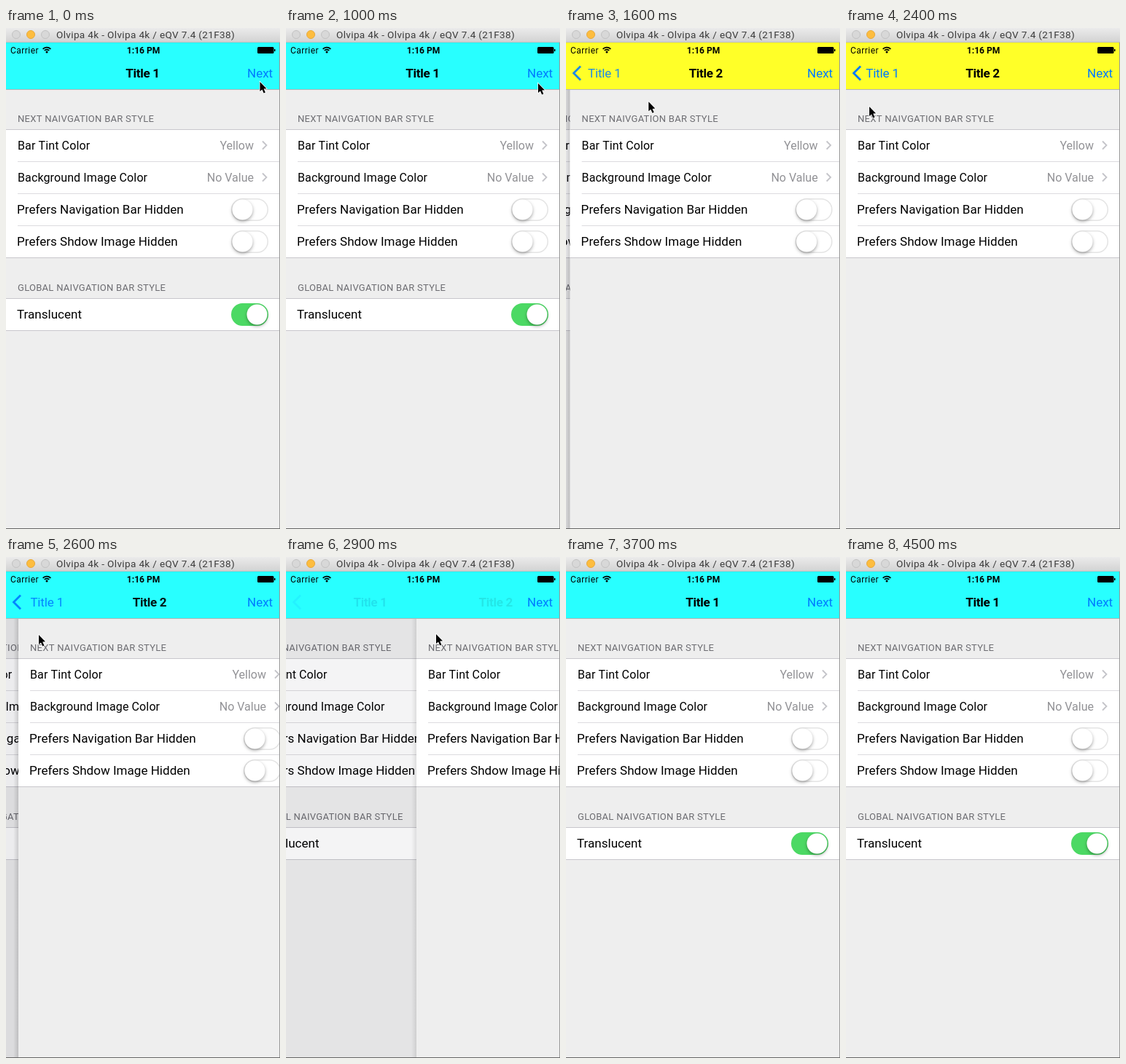
Write an HTML page with a canvas that moves like this. It is 376 px wide and 688 px high and loops after 4.6 s.

```html
<!DOCTYPE html>
<html lang="en">
<head>
<meta charset="utf-8">
<title>Navigation bar demo</title>
<style>
html, body { margin: 0; width: 100%; height: 100%; overflow: hidden; background: #eee; }
canvas { display: block; width: 376px; height: 688px; }
</style>
</head>
<body>
<canvas id="stage" width="376" height="688"></canvas>
<script>
const ctx = document.getElementById('stage').getContext('2d');
const LOOP = 4600, STEP = 100, WIDTH = 375;
const CYAN = '#28ffff', YELLOW = '#ffff28', BLUE = '#007aff', LINE = '#c8c7cc';
const PUSH_START = 1050, PUSH_TIME = 730, DRAG_START = 2500, RELEASE = 3300, POP_END = 3600;

// [time, x, y]
const CURSOR = [
  [0, 348.5, 74], [900, 348.5, 74], [1000, 346, 76], [1300, 250, 87.5], [1500, 150, 98],
  [1800, 40, 108], [2200, 33, 108], [2400, 32, 108], [2500, 20, 108], [2600, 45, 107],
  [2700, 112, 106], [2900, 206, 106], [3300, 289, 115], [3500, 345, 112], [3650, 390, 110]
];
// [time, left edge of the dragged page]
const DRAG = [[2500, 0], [2600, 17], [2700, 84], [2900, 179], [3300, 259]];

const clamp = v => Math.max(0, Math.min(1, v));
const easeOut = u => 1 - (1 - clamp(u)) ** 3;

function track(keys, t, column) {
  const next = keys.findIndex(k => k[0] > t);
  if (next < 0) return keys[keys.length - 1][column];
  if (next === 0) return keys[0][column];
  const a = keys[next - 1], b = keys[next];
  return a[column] + (b[column] - a[column]) * (t - a[0]) / (b[0] - a[0]);
}

function rect(x, y, w, h, color) {
  ctx.fillStyle = color;
  ctx.fillRect(x, y, w, h);
}

function text(str, x, y, { size = 17, weight = 400, color = '#000', gap = 0, align = 'left', alpha = 1 } = {}) {
  if (alpha <= 0) return;
  ctx.save();
  ctx.globalAlpha = alpha;
  ctx.font = `${weight} ${size}px Roboto, Inter, sans-serif`;
  ctx.letterSpacing = gap + 'px';
  ctx.textAlign = align;
  ctx.fillStyle = color;
  ctx.fillText(str, x, y);
  ctx.restore();
}

function polyline(points, color, width, alpha = 1) {
  ctx.save();
  ctx.globalAlpha = alpha;
  ctx.strokeStyle = color;
  ctx.lineWidth = width;
  ctx.beginPath();
  points.forEach(([x, y]) => ctx.lineTo(x, y));
  ctx.stroke();
  ctx.restore();
}

function circle(x, y, r, fill, stroke) {
  ctx.beginPath();
  ctx.arc(x, y, r, 0, Math.PI * 2);
  ctx.fillStyle = fill;
  ctx.fill();
  if (!stroke) return;
  ctx.strokeStyle = stroke;
  ctx.lineWidth = 1;
  ctx.stroke();
}

function toggle(y, on) {
  ctx.beginPath();
  ctx.roundRect(309.75, y - 14.75, 49.5, 29.5, 14.75);
  ctx.fillStyle = on ? '#4cd964' : '#fff';
  ctx.strokeStyle = on ? '#4cd964' : '#e4e4e4';
  ctx.lineWidth = 1.5;
  ctx.fill();
  ctx.stroke();
  ctx.save();
  ctx.shadowColor = 'rgba(0,0,0,.35)';
  ctx.shadowBlur = 4;
  ctx.shadowOffsetY = 2;
  circle(on ? 344.5 : 324.5, y, 14, '#fff');
  ctx.restore();
}

function group(header, top, rows) {
  text(header, 16, top - 10, { size: 13, color: '#6d6d72', gap: .28 });
  const height = rows.length * 44;
  rect(0, top, WIDTH, height, '#fff');
  rect(0, top, WIDTH, 1, LINE);
  rect(0, top + height, WIDTH, 1, LINE);
  rows.forEach(([label, value], i) => {
    const y = top + i * 44;
    if (i) rect(16, y, WIDTH - 16, 1, '#dcdbdf');
    if (typeof value === 'string') {
      text(label, 16, y + 28, { size: 16, gap: .12 });
      text(value, 340, y + 28, { size: 16, color: '#929296', align: 'right' });
      polyline([[352, y + 16.5], [357.5, y + 22], [352, y + 27.5]], '#c4c4c9', 1.8);
    } else {
      text(label, 15, y + 28, { gap: .03 });
      toggle(y + 22.5, value);
    }
  });
}

function page(x, isRoot) {
  ctx.save();
  ctx.translate(x, 0);
  rect(0, 84, WIDTH, 603, '#eee');
  group('NEXT NAIVGATION BAR STYLE', 139, [
    ['Bar Tint Color', 'Yellow'],
    ['Background Image Color', 'No Value'],
    ['Prefers Navigation Bar Hidden', false],
    ['Prefers Shdow Image Hidden', false]
  ]);
  if (isRoot) group('GLOBAL NAIVGATION BAR STYLE', 371, [['Translucent', true]]);
  ctx.restore();
}

// shown: 0 = root page only, 1 = second page fully in place
function pages(shown) {
  if (shown < 1) page(-112 * shown, true);
  if (shown <= 0) return;
  const x = WIDTH * (1 - shown);
  rect(0, 84, x, 603, `rgba(0,0,30,${.08 * shown})`);
  const shadow = ctx.createLinearGradient(x - 7, 0, x, 0);
  shadow.addColorStop(0, 'rgba(0,0,0,0)');
  shadow.addColorStop(1, `rgba(0,0,0,${.04 + .1 * shown})`);
  rect(x - 7, 84, 7, 603, shadow);
  page(x, false);
}

function statusBar() {
  text('Carrier', 6, 34.5, { size: 12, gap: .45 });
  text('1:16 PM', 188.5, 34.5, { size: 12, weight: 600, align: 'center' });
  ctx.strokeStyle = '#000';
  ctx.lineWidth = 1.7;
  for (const r of [4.4, 7.4]) {
    ctx.beginPath();
    ctx.arc(56, 34, r, -Math.PI * .76, -Math.PI * .24);
    ctx.stroke();
  }
  circle(56, 33, 1.5, '#000');
  ctx.beginPath();
  ctx.roundRect(345, 26, 22.5, 9, 1.5);
  ctx.fill();
  rect(368, 29, 1.5, 3, '#000');
}

function navBar(shown, popping, tint) {
  rect(0, 19, WIDTH, 65, tint);
  rect(0, 84, WIDTH, 1, '#b4b4b4');
  statusBar();

  const rest = 1 - shown;
  const rootAlpha = popping ? rest ** 3.5 : rest ** 2;
  const backAlpha = popping ? clamp(1 - rest / .53) : shown ** 6;
  const secondAlpha = popping ? backAlpha : shown;
  const rootX = 50 + 137.5 * rest;
  const title = { weight: 600, gap: -.3, align: 'center' };

  text('Title 1', rootX, 68, { ...title, alpha: rootAlpha });
  text('Title 1', rootX, 68, { color: BLUE, gap: -.15, align: 'center', alpha: backAlpha });
  text('Title 2', 187.5 + 210 * rest, 68, { ...title, alpha: secondAlpha });
  polyline([[20, 52.5], [10.5, 62], [20, 71.5]], BLUE, 2.8, backAlpha);
  text('Next', 331, 68, { color: BLUE });
}

function windowFrame() {
  const bar = ctx.createLinearGradient(0, 0, 0, 19);
  bar.addColorStop(0, '#ebebeb');
  bar.addColorStop(1, '#d3d3d3');
  rect(0, 0, 376, 19, bar);
  rect(0, 19, 376, 1, '#bdbdbd');
  circle(14, 9, 5.5, '#d8d8d8', '#c2c2c2');
  circle(34, 9, 5.5, '#fdbd3f', '#e8a93a');
  circle(54, 9, 5.5, '#d8d8d8', '#c2c2c2');
  text('Olvipa 4k - Olvipa 4k / eQV 7.4 (21F38)', 69, 14, { size: 13.5, color: '#3c3c3c', gap: .38 });
  rect(375, 20, 1, 668, '#999');
  rect(0, 687, 376, 1, '#666');
}

function cursor(t) {
  if (t >= 3650) return;
  ctx.save();
  ctx.translate(track(CURSOR, t, 1), track(CURSOR, t, 2));
  ctx.beginPath();
  [[0, 0], [0, 13], [3, 10.4], [5.2, 15.5], [7.4, 14.5], [5.2, 9.6], [9, 9.2]]
    .forEach(([x, y]) => ctx.lineTo(x, y));
  ctx.closePath();
  ctx.strokeStyle = '#fff';
  ctx.lineWidth = 1.4;
  ctx.stroke();
  ctx.fillStyle = '#000';
  ctx.fill();
  ctx.restore();
}

function shownAt(t) {
  if (t < DRAG_START) return easeOut((t - PUSH_START) / PUSH_TIME);
  const dragged = track(DRAG, t, 1);
  const settle = easeOut((t - RELEASE) / (POP_END - RELEASE));
  return 1 - (dragged + (WIDTH - dragged) * settle) / WIDTH;
}

function draw(now) {
  const t = Math.floor(now % LOOP / STEP) * STEP;
  const popping = t > DRAG_START;
  const barLag = popping ? 0 : 20;
  ctx.clearRect(0, 0, 376, 688);
  pages(shownAt(t));
  navBar(shownAt(t - barLag), popping, t > PUSH_START && !popping ? YELLOW : CYAN);
  windowFrame();
  cursor(t);
}

const start = performance.now();
function tick() {
  draw(performance.now() - start);
  requestAnimationFrame(tick);
}
tick();
</script>
</body>
</html>
```
